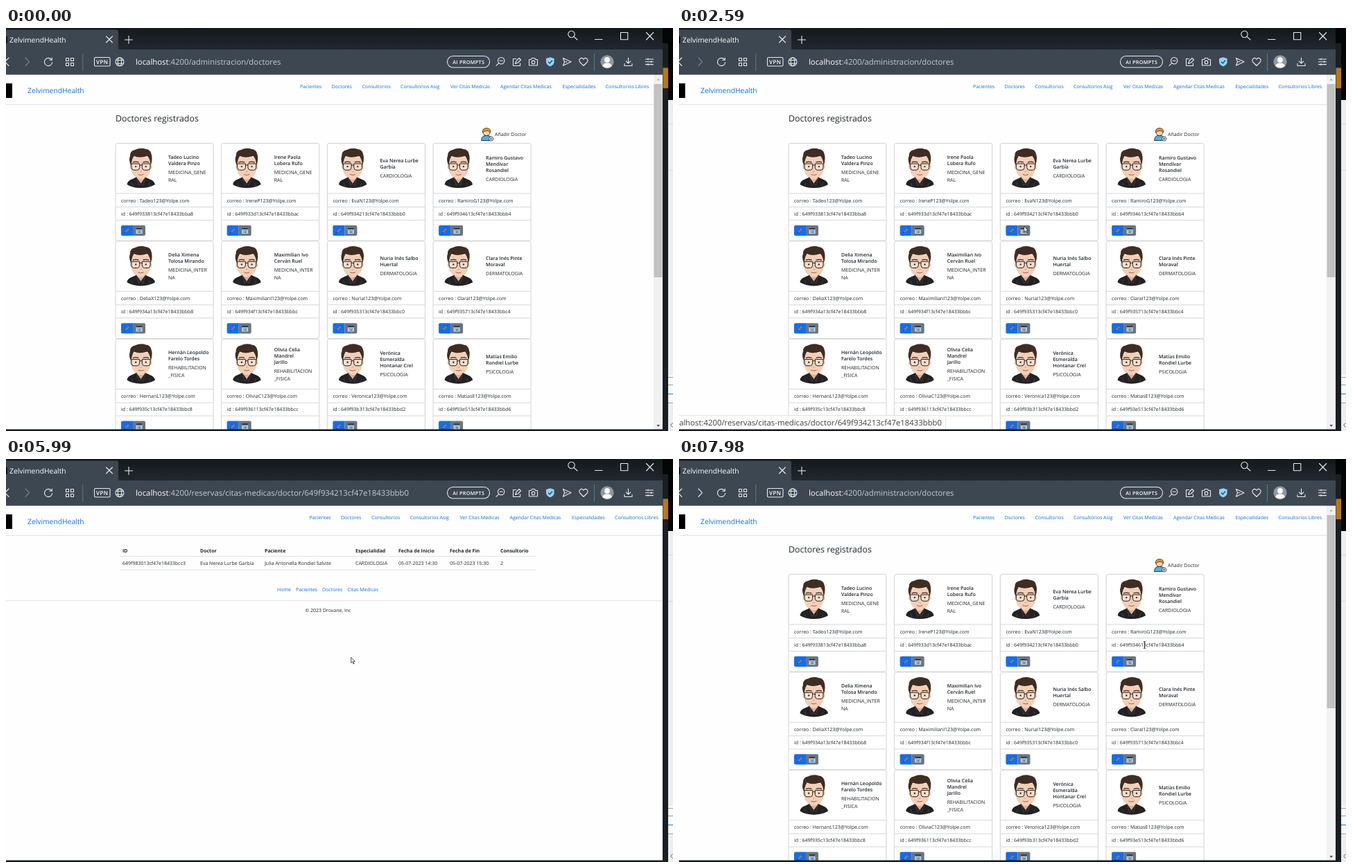
An HTML page for the animation above (8 s loop, 962 px wide and 582 px high).

```html
<!DOCTYPE html>
<html lang="es">
<head>
<meta charset="utf-8">
<title>ZelvimendHealth</title>
<style>
  html, body { margin: 0; width: 100%; height: 100%; overflow: hidden; background: #fff; }
  svg { display: block; width: 100vw; height: 100vh; }
  text { font: 7px "Open Sans", "Noto Sans", sans-serif; fill: #212529; text-rendering: geometricPrecision; white-space: pre; }
  .link { fill: #0d6efd; }
  .bold { font-weight: 700; }
  .name { font-weight: 600; }
  .title { font-size: 12.4px; font-weight: 500; }
  .brand { font-size: 10.3px; }
  .url { font-size: 11.33px; }
  .rule { stroke: #dee2e6; fill: none; }
  .icon { stroke: #e8ebee; stroke-width: 1.1; fill: none; stroke-linecap: round; stroke-linejoin: round; }
</style>
</head>
<body>
<script>
const LOOP = 8000;
const ID_TAIL = '13cf47e18433bb';
const LIST_URL = '/administracion/doctores';
const DOCTOR_URL = `/reservas/citas-medicas/doctor/649f9342${ID_TAIL}b0`;

const text = (x, y, s, cls = '', extra = '') => `<text x="${x}" y="${y}" class="${cls}" ${extra}>${s}</text>`;
const rect = (x, y, w, h, fill, extra = '') => `<rect x="${x}" y="${y}" width="${w}" height="${h}" fill="${fill}" ${extra}/>`;
const path = (d, extra = '') => `<path d="${d}" ${extra}/>`;
const icon = d => path(d, 'class="icon"');
const rule = (x1, x2, y) => path(`M${x1} ${y}H${x2}`, 'class="rule"');
const shift = (x, y, s) => `<g transform="translate(${x} ${y})">${s}</g>`;

const SPECIALTIES = {
  general: ['MEDICINA_GENE', 'RAL'], internal: ['MEDICINA_INTER', 'NA'], rehab: ['REHABILITACION', '_FISICA'],
  cardio: ['CARDIOLOGIA'], derma: ['DERMATOLOGIA'], psico: ['PSICOLOGIA'],
};
const DOCTORS = [
  ['Tadeo Lucino|Valdera Pinzo', 'general', 'Tadeo', '38', 'a8'],
  ['Irene Paola|Lobera Rufo', 'general', 'IreneP', '3d', 'ac'],
  ['Eva Nerea Lurbe|Garbía', 'cardio', 'EvaN', '42', 'b0'],
  ['Ramiro Gustavo|Mendívar|Rosandiel', 'cardio', 'RamiroG', '46', 'b4'],
  ['Delia Ximena|Tolosa Mirando', 'internal', 'DeliaX', '4a', 'b8'],
  ['Maximilian Ivo|Cerván Ruel', 'internal', 'MaximilianI', '4f', 'bc'],
  ['Nuria Inés Salbo|Huertal', 'derma', 'NuriaI', '53', 'c0'],
  ['Clara Inés Pinte|Moraval', 'derma', 'ClaraI', '57', 'c4'],
  ['Hernán Leopoldo|Farelo Tordes', 'rehab', 'HernanL', '5c', 'c8'],
  ['Olivia Celia|Mandrel|Jarillo', 'rehab', 'OliviaC', '61', 'cc'],
  ['Verónica|Esmeralda|Hontanar Crel', 'psico', 'Veronica', 'b3', 'd2'],
  ['Matías Emilio|Rondiel Lurbe', 'psico', 'MatiasE', 'e5', 'd6'],
];

const portrait =
  path('M30.5 46H42.5V54L36.5 60 30.5 54Z', 'fill="#dfae91"') +
  '<ellipse cx="22.3" cy="34" rx="1.7" ry="3.4" fill="#e9bd9f"/><ellipse cx="50.7" cy="34" rx="1.7" ry="3.4" fill="#e9bd9f"/>' +
  path('M22.5 20H50.5V38Q49.5 46 42 50.5Q36.5 53.5 31 50.5Q23.5 46 22.5 38Z', 'fill="#f4cfb6"') +
  path('M16.5 59.5Q17 54 23.5 52L30 49 36.5 58 43 49 49.5 52Q56 54 57 59.5Q49 64.6 36.5 64.6T16.5 59.5Z', 'fill="#222225"') +
  path('M30 49L33.5 61 36.5 58 39.5 61 43 49M23.5 57L25 62M49.5 57L48 62', 'fill="none" stroke="#47474b" stroke-width=".8"') +
  path('M22.2 32Q18.5 24 21 18Q20.5 11 28 9.5Q36 5.5 44 8.5Q50 9 51.5 15Q54 22 50.8 32L49.5 25Q48.5 21 46 18.5Q34 22 26.5 18.5Q24 22 23.5 26Z', 'fill="#3f2d22"') +
  path('M25 27.6Q28.5 25.6 33.5 27.4M39.5 27.4Q44.5 25.6 48 27.6', 'fill="none" stroke="#3a2a20" stroke-width="1.3"') +
  path('M23 29.5H34.7V35Q34.2 38.7 31.5 38.7H26Q23.5 38.7 23 35ZM38.3 29.5H50V35Q49.5 38.7 47 38.7H41.5Q38.8 38.7 38.3 35ZM34.7 32Q36.5 30.7 38.3 32', 'fill="#fff5" stroke="#25211f"') +
  '<circle cx="29.2" cy="33.6" r="1.2" fill="#3b2a22"/><circle cx="43.8" cy="33.6" r="1.2" fill="#3b2a22"/>' +
  path('M35 40.5Q36.5 41.8 38 40.5', 'fill="none" stroke="#c98f72" stroke-width=".8"') +
  path('M32.5 45Q36.5 47 40.5 45', 'fill="none" stroke="#a85a4c"');

const buttons =
  path('M25 118.5H10Q8 118.5 8 120.5V131.5Q8 133.5 10 133.5H25Z', 'fill="#0d6efd"') +
  path('M25 118.5H41Q43 118.5 43 120.5V131.5Q43 133.5 41 133.5H25Z', 'fill="#6c757d"') +
  path('M14 128.6L19.5 123.2', 'stroke="#b9792f" stroke-width="1.9"') +
  path('M12.6 130L14.2 128.4M19.2 123.5L20.2 122.5', 'stroke="#4a4550" stroke-width="1.6"') +
  rect(29.5, 122, 9, 8.5, '#c5d9e6') + rect(29.5, 122, 9, 2.4, '#29394a') +
  path('M31 126H37M31 128.4H37', 'stroke="#3f607c" stroke-dasharray="1.4 .9"') +
  rect(33, 127, 2.5, 2.5, '#3188c4');

function card([fullName, specialty, user, a, b], i) {
  const names = fullName.split('|'), lines = SPECIALTIES[specialty];
  let y = 36.5 - (9 * names.length + 11 * lines.length + 3) / 2;
  let s = rect(0, 0, 141, 140.6, '#fff', 'rx="2.5" stroke="#d0d2d4"') + '<use href="#portrait"/>';
  for (const n of names) { s += text(76, y + 7, n, 'name'); y += 9; }
  y += 3;
  for (const l of lines) { s += text(76, y + 8, l); y += 11; }
  for (const ly of [72.5, 92, 111]) s += path(`M0 ${ly}H141`, 'stroke="#d5d7d9"');
  s += text(8, 85, `correo : ${user}123@Yolpe.com`) + text(8, 104, `id : 649f93${a}${ID_TAIL}${b}`) + '<use href="#buttons"/>';
  return shift(158 + 152.7 * (i % 4), 166.5 + 141.3 * Math.floor(i / 4), s);
}

const NAV = [['Pacientes', 424], ['Doctores', 469.5], ['Consultorios', 513.5], ['Consultorios Asig', 569], ['Ver Citas Medicas', 641],
  ['Agendar Citas Medicas', 713], ['Especialidades', 802.5], ['Consultorios Libres', 864.5]];
const nav = dx => NAV.map(([s, x]) => text(x + dx, 86.5, s, 'link')).join('');

const addIcon =
  path('M685.5 162.5Q686 155.5 691 155.5H695Q700 155.5 700.5 162.5Z', 'fill="#4fb0e8" stroke="#1c2b3a" stroke-width=".9"') +
  '<circle cx="693" cy="150.5" r="5" fill="#fbd3a8" stroke="#2b2320" stroke-width=".8"/>' +
  path('M687.5 151Q686.5 144.5 693 144.5T698.5 151Q697 148 693 148.5T687.5 151Z', 'fill="#e8912d" stroke="#2b2320" stroke-width=".7"') +
  '<circle cx="699.7" cy="160" r="3.1" fill="#fff" stroke="#222" stroke-width=".8"/>' +
  path('M698 160H701.4M699.7 158.3V161.7', 'stroke="#222" stroke-width=".8"');
const heading = dx => shift(dx, 0, text(158, 134.5, 'Doctores registrados', 'title') + addIcon + text(705, 155.5, 'Añadir Doctor'));

const footer = dy => shift(0, dy,
  [['Home', 391], ['Pacientes', 418], ['Doctores', 456], ['Citas Medicas', 492.5]].map(([s, x]) => text(x, 171.5, s, 'link')).join('') +
  rule(0, 947, 185.5) + text(464.5, 201.5, '© 2023 Drovane, Inc', '', 'text-anchor="middle"'));

const HEADERS = ['ID', 'Doctor', 'Paciente', 'Especialidad', 'Fecha de Inicio', 'Fecha de Fin', 'Consultorio'];
const ROW = ['649f983013cf47e18433bcc3', 'Eva Nerea Lurbe Garbía', 'Julia Antonella Rondiel Salvite', 'CARDIOLOGIA', '05-07-2023 14:30', '05-07-2023 15:30', '2'];
const cells = (labels, xs, y, cls) => labels.map((s, i) => text(xs[i], y, s, cls)).join('');
const EMPTY_X = [168, 199.5, 264, 339.5, 443.5, 565, 669], FULL_X = [168, 280, 373, 504, 566, 640, 713];

const scrollbar = rect(934, 67, 13, 513, '#f1f1f1') + rect(934.5, 81, 12, 279, '#c1c1c1') +
  path('M938.5 75.5L940.7 73 942.9 75.5Z', 'fill="#a8a8a8"') + path('M938.3 573L940.7 576 943.1 573Z', 'fill="#505050"');

const PAGES = {
  list: nav(0) + heading(0) + DOCTORS.map(card).join('') + scrollbar,
  empty: nav(13.5) + cells(HEADERS, EMPTY_X, 134.5, 'bold') + rule(165, 764, 140.5) + footer(0),
  rows: nav(13.5) + cells(HEADERS, FULL_X, 134.5, 'bold') + rule(165, 764, 140.5) + cells(ROW, FULL_X, 153.2) + rule(165, 764, 160) + footer(19.2),
  bare: nav(13.5) + heading(6.7) + footer(25.5),
};

const browser =
  rect(0, 0, 947, 31, 'url(#bar)') + rect(0, 31, 947, 36.5, '#3c4752') +
  path('M0 2.5H159Q162 2.5 162 6V31H0Z', 'fill="#3c4752"') + rect(0, 12, 1.5, 10, '#000') +
  text(5, 21, 'ZelvimendHealth', 'brand', 'style="fill:#fff"') +
  icon('M144.5 12L153.5 21M153.5 12L144.5 21M171.5 17H182.5M177 11.5V22.5') +
  icon('M820.2 9A4.7 4.7 0 1 1 810.8 9A4.7 4.7 0 1 1 820.2 9M819 12.3L824 17M849.5 16.5H860M886.5 6.5H896.8V16.8H886.5ZM923.5 6.5L933.8 17M933.8 6.5L923.5 17') +
  icon('M4 43L-1.5 48.7 4 54.5M65.5 45.5A5.6 5.6 0 1 0 66.7 49.5M66.3 43V46.3H62.8') +
  icon('M86.5 43.5H90.5V47.5H86.5ZM93.5 43.5H97.5V47.5H93.5ZM86.5 50.5H90.5V54.5H86.5ZM93.5 50.5H97.5V54.5H93.5Z') +
  path('M110.8 37V62M848.5 37V62', 'stroke="#6b7681"') +
  icon('M129 42.5H148.5Q150 42.5 150 44V53.5Q150 55 148.5 55H129Q127.5 55 127.5 53.5V44Q127.5 42.5 129 42.5Z') +
  text(138.8, 51.8, 'VPN', 'name', 'text-anchor="middle" style="fill:#fff;font-size:8px;letter-spacing:.4px"') +
  '<g class="icon"><circle cx="164" cy="48.8" r="6"/><ellipse cx="164" cy="48.8" rx="2.7" ry="6"/><path d="M158.6 46.5H169.4M158.6 51.2H169.4"/>' +
  '<rect x="636.5" y="40.5" width="61" height="16.5" rx="8.2"/><circle cx="714.2" cy="47.2" r="4.7"/><path d="M712 47.2H716.4M710.8 50.6L707 54.4"/>' +
  '<path d="M735.5 44.5H731.5V54.5H741.5V51M734.5 51.5L736 47.5 740 43.5 742.5 46 738.5 50Z"/>' +
  '<path d="M754.5 45.5H757.5L758.5 43.5H762.5L763.5 45.5H766.5V54H754.5Z"/><circle cx="760.5" cy="49.4" r="2.3"/>' +
  '<path d="M803.5 43.5L815 48.8 803.5 54.2 805.5 48.8ZM805.5 48.8H809"/>' +
  '<path d="M833 54.5L828 49.5Q825.8 46.5 828 44.3Q830.8 42 833 45.2Q835.2 42 838 44.3Q840.2 46.5 838 49.5Z"/>' +
  '<path d="M897.5 43V51M894.3 48L897.5 51.2 900.7 48M892 51.5V54.5H903V51.5"/>' +
  '<path d="M922.5 45H933.5M922.5 48.8H933.5M922.5 52.6H933.5M926 44V46M930.5 47.8V49.8M926 51.6V53.6"/></g>' +
  text(667.2, 51.6, 'AI PROMPTS', 'name', 'text-anchor="middle" style="fill:#fff;font-size:7.2px;letter-spacing:.35px"') +
  path('M784.8 42.3L790.6 44V49Q790.6 53 784.8 55.6Q779 53 779 49V44Z', 'fill="#8fd4fa"') +
  path('M782 48.8L784.2 51 788 46.8', 'fill="none" stroke="#2e4658" stroke-width="1.3"') +
  '<circle cx="867" cy="48.8" r="9.6" fill="#8d98a3"/><circle cx="867" cy="46" r="3.9" fill="#fff"/>' + path('M860 55Q861 50.5 867 50.5T874 55Q867 60 860 55Z', 'fill="#fff"') +
  path('M28 43L33.5 48.7 28 54.5', 'id="forward" class="icon"') +
  `<text x="187" y="52.6" class="url" style="fill:#c5ccd3"><tspan fill="#fff">localhost</tspan>:4200<tspan id="route"></tspan></text>`;

const desktop =
  rect(0, 579.5, 962, 2.5, '#1a1d21') + rect(947, 0, 8, 582, '#1b1e22') + rect(947, 0, 8, 22, '#050505') +
  rect(955, 0, 7, 104, '#050505') + rect(947.5, 57.5, 7.5, 29.5, '#b9790c') + rect(955, 104, 7, 478, '#eceef0') +
  path('M955 138.5H962M955 205.5H962', 'stroke="#d5d8db"') + rect(955, 501, 7, 42, '#fafafa') +
  path('M955 504.5H962M955 515.5H962M955 541.5H962', 'stroke="#9a9da0"') + path('M955 528.5H962', 'stroke="#4aa3e0" stroke-width="1.5"') +
  path('M961.5 570.5L958.5 573.5 961.5 576.5', 'fill="none" stroke="#555"');

document.body.innerHTML = `<svg viewBox="0 0 962 582" preserveAspectRatio="none">
  <defs>
    <linearGradient id="bar" x2="0" y2="1"><stop stop-color="#14181b"/><stop offset="1" stop-color="#21282e"/></linearGradient>
    <g id="portrait">${portrait}</g><g id="buttons">${buttons}</g>
  </defs>
  ${rect(0, 0, 962, 582, '#fefefe')}
  ${rect(0, 80, 9, 21, '#000')}${text(31, 93.5, 'ZelvimendHealth', 'brand link')}${rule(0, 947, 110.5)}
  ${Object.entries(PAGES).map(([k, s]) => `<g id="${k}">${s}</g>`).join('')}
  <g id="status">${rect(-5, 559.5, 389.5, 26, '#fefefe', 'rx="3" stroke="#e2e2e2"')}${text(379, 574, 'localhost:4200' + DOCTOR_URL, 'url', 'text-anchor="end" style="fill:#404040"')}</g>
  ${browser}${desktop}
  <g id="cursor">
    ${path('M0 0V8.2L1.9 6.5 3.3 9.7 4.5 9.2 3.2 6.1H5.7Z', 'id="arrow" fill="#fff" stroke="#222" stroke-width=".75"')}
    ${path('M-1 1Q0 -.6 1 1V4.3L4 5.2Q5 5.6 4.8 7L4 11H-.8L-3.2 7.4Q-3.2 5.8 -1 7Z', 'id="hand" fill="#fff" stroke="#111" stroke-width=".8"')}
    ${path('M-1.7 -4.7H1.7M0 -4.7V4.7M-1.7 4.7H1.7', 'id="beam" fill="none" stroke="#222" stroke-width=".9"')}
  </g>
</svg>`;

const bezier = (a, b, c, p) => (1 - p) ** 2 * a + 2 * p * (1 - p) * b + p * p * c;
// The pointer jumps between sampled positions: [time, x, y, shape]
const TRACK = [
  ...Array.from({ length: 12 }, (_, i) => [200 + i * 720 / 11, bezier(891, 700, 777, i / 11), bezier(546, 430, 365, i / 11), 'arrow']),
  [1260, 705, 352, 'arrow'], [1330, 580, 325, 'arrow'], [1400, 486, 308, 'arrow'], [1460, 459, 304, 'arrow'],
  [1650, 477, 293, 'hand'], [1720, 484.5, 290, 'hand'], [1790, 488, 289, 'hand'], [1850, 492, 288, 'hand'], [1920, 496, 287, 'hand'], [1990, 498.5, 286.5, 'hand'],
  [2520, 497.7, 286.3, 'arrow'], [6450, 497.7, 283, 'arrow'], [6520, 497.5, 279, 'arrow'], [6580, 497.3, 277.3, 'arrow'], [6720, 498.5, 277.3, 'arrow'],
  [6780, 498, 277.3, 'arrow'], [6980, 496, 275, 'arrow'], [7050, 492.7, 271, 'arrow'], [7380, 494, 270, 'beam'],
  [7780, 520, 265, 'beam'], [7850, 577, 262, 'beam'], [7910, 638, 264, 'beam'], [7980, 671.5, 268.5, 'beam'],
];
const ROUTES = [[0, 'list'], [2660, 'empty'], [5990, 'rows'], [7180, 'bare'], [7380, 'list']];
const STATUS = [[0, 0], [1920, .5], [1990, 1], [2720, .5], [2790, .06], [5990, 0]];
const at = (keys, t) => keys.findLast(k => k[0] <= t);
const $ = id => document.getElementById(id);
const show = (id, on) => { $(id).style.display = on ? '' : 'none'; };

function render(t) {
  const page = at(ROUTES, t)[1];
  for (const k in PAGES) show(k, k === page);
  $('route').textContent = page === 'list' || page === 'bare' ? LIST_URL : DOCTOR_URL;
  $('forward').style.stroke = t >= 7180 ? '#e8ebee' : '#7d8893';
  $('status').style.opacity = at(STATUS, t)[1];
  const pointer = at(TRACK, t);
  show('cursor', pointer);
  if (pointer) {
    const [, x, y, shape] = pointer;
    $('cursor').setAttribute('transform', `translate(${x} ${y})`);
    for (const s of ['arrow', 'hand', 'beam']) show(s, s === shape);
  }
}

const start = performance.now();
(function tick() {
  render((performance.now() - start) % LOOP);
  requestAnimationFrame(tick);
})();
</script>
</body>
</html>
```
